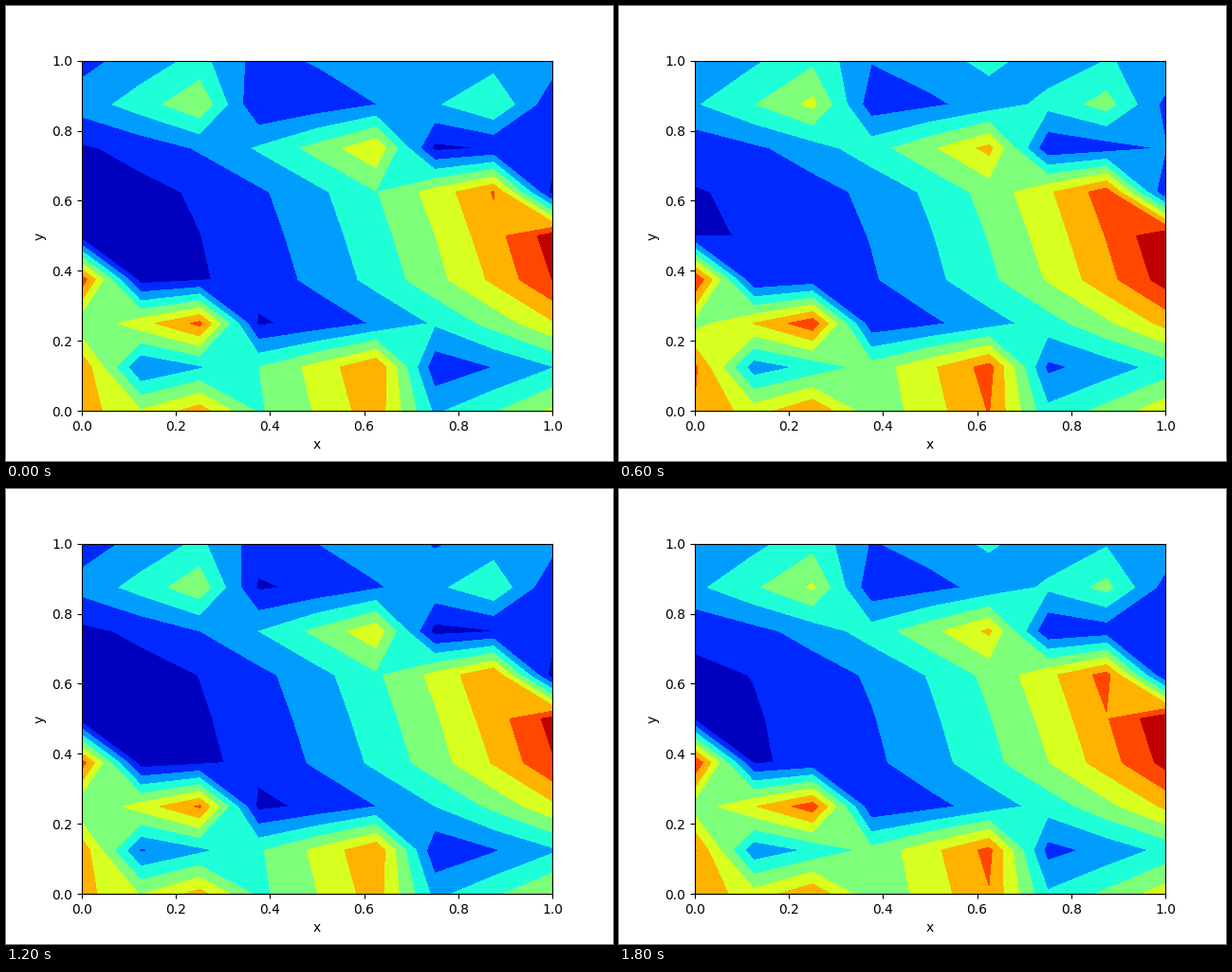
Recreate the animation shown at these times as a matplotlib script. Size 640 by 480 pixels, loop 2000 ms.

```python
import numpy as np
import matplotlib.pyplot as plt
from matplotlib.animation import FuncAnimation

CELLS = 8
FRAMES = 10
INTERVAL = 200
DT = 0.2
STEP = 0.5

grid = np.linspace(0, 1, CELLS + 1)


def diagonal_nodes():
    """Mesh nodes (x, y) taken diagonal by diagonal from the top left corner."""
    for d in range(2 * CELLS + 1):
        for i in range(max(0, d - CELLS), min(d, CELLS) + 1):
            yield i / CELLS, 1 - (d - i) / CELLS


x, y = np.array(list(diagonal_nodes())).T

fig, ax = plt.subplots(figsize=(6.4, 4.8), dpi=100)


def solution(t):
    """Heat equation solution, its nodes laid out row by row in diagonal order."""
    u = 1 + x**2 + 3 * y**2 + 1.2 * t
    return u.reshape(CELLS + 1, CELLS + 1)


def update(n):
    u = solution((n + 1) * DT)
    low = STEP * np.floor(u.min() / STEP)
    ax.clear()
    ax.contourf(grid, grid, u, levels=low + STEP * np.arange(10), cmap="jet")
    ax.set_xlabel("x")
    ax.set_ylabel("y")
    return []


anim = FuncAnimation(fig, update, frames=FRAMES, interval=INTERVAL, repeat=True)
plt.show()
```
